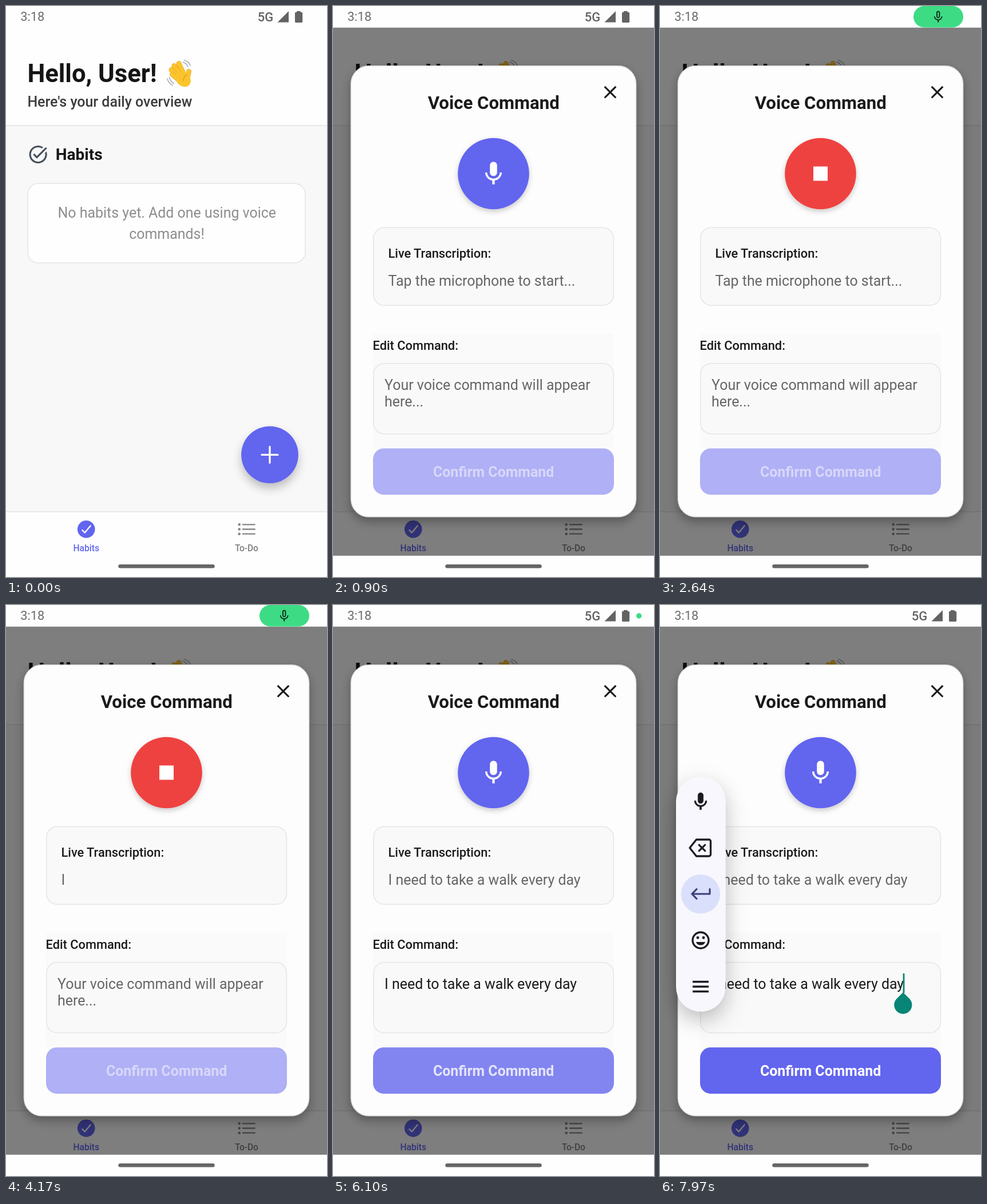
These frames come from a looping animation (561x998 px, 8 s). An HTML page:

```html
<!DOCTYPE html>
<html lang="en">
<head>
<meta charset="utf-8">
<title>Voice command</title>
<style>
  html, body { margin: 0; width: 100%; height: 100%; overflow: hidden; background: #fefefe; }
  svg { display: block; width: 561px; height: 998px; font-family: Roboto, "Noto Sans", sans-serif; font-size: 24.93px; }
  .medium { font-weight: 500; }
  .semi { font-weight: 600; }
  .bold { font-weight: 700; }
  .mid { text-anchor: middle; }
  .label { font-size: 21.8px; font-weight: 500; fill: #1a1a1a; }
  .tab { font-size: 15.6px; font-weight: 500; text-anchor: middle; }
  .hint { fill: #666; }
  .box { stroke: #e5e5e5; stroke-width: 1.5; }
  .line { fill: none; stroke-linecap: round; stroke-linejoin: round; }
</style>
</head>
<body>
<svg viewBox="0 0 561 998">
  <defs>
    <filter id="fabShadow" x="-50%" y="-50%" width="200%" height="200%">
      <feDropShadow dx="0" dy="9" stdDeviation="8" flood-opacity=".24"/>
    </filter>
    <filter id="micShadow" x="-50%" y="-50%" width="200%" height="200%">
      <feDropShadow dx="0" dy="4" stdDeviation="5" flood-opacity=".2"/>
    </filter>
    <filter id="sheetShadow" x="-20%" y="-20%" width="140%" height="140%">
      <feDropShadow dx="0" dy="8" stdDeviation="9" flood-opacity=".3"/>
    </filter>
    <filter id="barShadow" x="-100%" y="-30%" width="300%" height="160%">
      <feDropShadow dx="0" dy="14" stdDeviation="18" flood-opacity=".26"/>
    </filter>
    <path id="micIcon" d="M12 14c1.66 0 2.99-1.34 2.99-3L15 5c0-1.66-1.34-3-3-3S9 3.34 9 5v6c0 1.66 1.34 3 3 3zm5.3-3c0 3-2.54 5.1-5.3 5.1S6.7 14 6.7 11H5c0 3.41 2.72 6.23 6 6.72V21h2v-3.28c3.28-.48 6-3.3 6-6.72h-1.7z"/>
  </defs>

  <!-- home page -->
  <rect width="561" height="998" fill="#fefefe"/>
  <rect y="209" width="561" height="675" fill="#f8f8f8"/>
  <path d="M0 209H561M0 884H561" stroke="#e4e4e4" stroke-width="1.6"/>
  <text class="bold" x="37.4" y="133.3" font-size="43.6" fill="#151515">Hello, User!</text>
  <g id="wave" class="line"></g>
  <text class="medium" x="37.4" y="176" fill="#3c3c3c">Here's your daily overview</text>
  <path transform="translate(37.4 240.8) scale(1.558)" fill="#474f5d" d="M22 5.18 10.59 16.6l-4.24-4.24 1.41-1.41 2.83 2.83 10-10L22 5.18zm-2.21 5.04c.13.57.21 1.17.21 1.78 0 4.42-3.58 8-8 8s-8-3.58-8-8 3.58-8 8-8c1.58 0 3.04.46 4.28 1.25l1.44-1.44C16.1 2.67 14.13 2 12 2 6.48 2 2 6.48 2 12s4.48 10 10 10 10-4.48 10-10c0-1.19-.22-2.33-.6-3.39l-1.61 1.61z"/>
  <text class="semi" x="86.8" y="269" font-size="28" fill="#151515">Habits</text>
  <rect class="box" x="38" y="310.3" width="485" height="138.7" rx="18.7" fill="#fefefe"/>
  <g class="mid" fill="#8d8d8d">
    <text x="281.3" y="369.8">No habits yet. Add one using voice</text>
    <text x="281" y="407.2">commands!</text>
  </g>
  <g id="fab">
    <circle cx="461" cy="784.3" r="49.9" fill="#6265ee" filter="url(#fabShadow)"/>
    <path class="line" d="M461 770.3v28M447 784.3h28" stroke="#fff" stroke-width="3.3"/>
  </g>
  <circle cx="140.2" cy="914.5" r="15.3" fill="#6265ee"/>
  <path class="line" d="M133.3 916l4.4 4.5 10-12" stroke="#fff" stroke-width="2.3"/>
  <text class="tab" x="140.2" y="953.3" fill="#6265ee">Habits</text>
  <path class="line" d="M413.8 906.3h21M413.8 914.5h21M413.8 922.7h21" stroke="#858585" stroke-width="2.3"/>
  <path class="line" d="M407.7 906.3h0M407.7 914.5h0M407.7 922.7h0" stroke="#858585" stroke-width="4.6"/>
  <text class="tab" x="420.5" y="953.3" fill="#808080">To-Do</text>

  <!-- voice dialog -->
  <g id="dialog">
    <rect y="37.8" width="561" height="923" fill-opacity=".5"/>
    <rect x="31.5" y="104.8" width="498" height="788" rx="31" fill="#fdfdfd" stroke="#dfdfdf" stroke-width="1.4" filter="url(#sheetShadow)"/>
    <text class="bold mid" x="280.7" y="179.5" font-size="31.16" fill="#1a1a1a">Voice Command</text>
    <path transform="translate(465.8 132) scale(1.558)" fill="#1a1a1a" d="M19 6.41L17.59 5 12 10.59 6.41 5 5 6.41 10.59 12 5 17.59 6.41 19 12 13.41 17.59 19 19 17.59 13.41 12z"/>
    <circle id="micDisc" cx="280.5" cy="293" r="62.3" filter="url(#micShadow)"/>
    <use id="micOn" href="#micIcon" transform="translate(255.5 268) scale(2.083)" fill="#fff"/>
    <rect id="stop" x="268" y="280.5" width="25" height="25" fill="#fff"/>
    <rect class="box" x="70.8" y="387.3" width="419.6" height="136" rx="18.7" fill="#f9f9f9"/>
    <text class="label" x="96.5" y="440">Live Transcription:</text>
    <text class="hint" id="live" x="96.5" y="489"></text>
    <rect x="70" y="573" width="420.5" height="200" fill="#fafafa"/>
    <text class="label" x="69.6" y="600.5">Edit Command:</text>
    <rect class="box" x="70.8" y="624.8" width="419.6" height="123" rx="18.7" fill="#f9f9f9"/>
    <g id="placeholder" class="hint">
      <text x="90" y="670.8">Your voice command will appear</text>
      <text x="90" y="700">here...</text>
    </g>
    <text id="edit" x="90" y="670.8" fill="#1a1a1a">I need to take a walk every day</text>
    <g id="caret" fill="#078576">
      <rect x="424.6" y="644" width="2.8" height="34"/>
      <path d="M424.8 677l11.05 11.05A15.6 15.6 0 1 1 413.75 688.05z"/>
    </g>
    <rect id="button" x="70" y="773.2" width="421" height="81" rx="18.7" fill="#6265ee"/>
    <text id="buttonText" class="semi mid" x="280.6" y="822.6" fill="#fff">Confirm Command</text>
  </g>

  <!-- keyboard side bar -->
  <g id="sidebar">
    <rect x="28" y="300.5" width="86.5" height="410" rx="43" fill="#f8f7fd" filter="url(#barShadow)"/>
    <use href="#micIcon" transform="translate(52.3 325) scale(1.558)" fill="#1b1b20" stroke="#1b1b20" stroke-width=".4"/>
    <g class="line" stroke="#1b1b20" stroke-width="3.3">
      <path d="M63.5 410H85.5a3 3 0 0 1 3 3V436a3 3 0 0 1-3 3H63.5L52 424.5zM68.3 419.3l10.4 10.4M78.7 419.3l-10.4 10.4"/>
      <circle cx="71" cy="586" r="14"/>
      <path stroke-linecap="butt" d="M57 658.5h28M57 667h28M57 675.5h28"/>
    </g>
    <g fill="#1b1b20">
      <circle cx="66" cy="581.5" r="2.4"/>
      <circle cx="76" cy="581.5" r="2.4"/>
      <path d="M62.8 589H79.2a8.8 8.8 0 0 1-16.4 0z"/>
    </g>
    <circle cx="71" cy="505.2" r="34.2" fill="#dadffb"/>
    <path class="line" d="M87 496.5V505H56M64 496.7L55.8 505l8.2 8.3" stroke="#3b4078" stroke-width="3.1"/>
  </g>

  <!-- system bars -->
  <text x="25.3" y="26" font-size="21.8" fill="#6b6b6b">3:18</text>
  <g id="signal" fill="#636363">
    <text class="medium" x="439.7" y="26.6" font-size="22">5G</text>
    <path d="M474.5 28.5L494 9V28.5zM508 9h6.8v2h2q1.4 0 1.4 1.4V27.6q0 1.4-1.4 1.4h-10.4q-1.4 0-1.4-1.4V12.4q0-1.4 1.4-1.4h1.6z"/>
  </g>
  <rect id="chip" fill="#3ddc84"/>
  <path id="chipMic" transform="translate(473.6 6.5) scale(1.05)" fill="#10281a" d="M12 14c1.66 0 2.99-1.34 2.99-3L15 5c0-1.66-1.34-3-3-3S9 3.34 9 5v6c0 1.66 1.34 3 3 3zm-1.2-9.1c0-.66.54-1.2 1.2-1.2s1.2.54 1.2 1.2l-.01 6.2c0 .66-.53 1.2-1.19 1.2s-1.2-.54-1.2-1.2V4.9zm6.5 6.1c0 3-2.54 5.1-5.3 5.1S6.7 14 6.7 11H5c0 3.41 2.72 6.23 6 6.72V21h2v-3.28c3.28-.48 6-3.3 6-6.72h-1.7z"/>
  <rect x="196.3" y="976" width="168.4" height="6.4" rx="3.2" fill="#666"/>
</svg>
<script>
const LOOP = 8000, STEP = 200 / 3;
const $ = id => document.getElementById(id);
const set = (id, attrs) => {
  for (const key in attrs) $(id).setAttribute(key, attrs[key]);
};
const show = (id, on) => set(id, { opacity: +on });
const ramp = (t, start, length) => Math.min(1, Math.max(0, (t - start) / length));
const mix = (a, b, u) => a + (b - a) * u;
const inOut = u => u < .5 ? 2 * u * u : 1 - 2 * (1 - u) ** 2;
const easeOut = u => 1 - (1 - u) ** 2;

// Opacity of a tapped button: down to 0.2, then back.
const tap = (t, start) => t < start + 160
  ? mix(1, .2, inOut(ramp(t, start, 150)))
  : mix(.2, 1, inOut(ramp(t, start + 160, 250)));

const words = "I need to take a walk every day".split(" ");
const wordTimes = [4160, 4225, 4425, 4560, 4890, 4960, 5425, 6090];

function buildWave() {
  const finger = d => `<path d="${d}" stroke="#e2a11f" stroke-width="8.8"/><path d="${d}" stroke="#fcc42c" stroke-width="7.4"/>`;
  $("wave").innerHTML =
    ["M316 131L319.5 114.5", "M311 120L302 100.5", "M306 122L293.8 104.5", "M303 126L289 111.5", "M304 131L290.5 119.5"].map(finger).join("") +
    `<ellipse cx="309.5" cy="127.5" rx="15" ry="11.8" transform="rotate(48 309.5 127.5)" fill="#fcc42c"/>
     <path d="M310 131q0-9 7-11" stroke="#e2a11f" stroke-width="1.4"/>
     <path d="M309 98q6.5 2 9 8.5M311.5 94.8q8 2 11 9.5M285.5 124.5q1.5 7.5 8 11M281.8 127q2 8 9.3 11.5" stroke="#a6aeb2" stroke-width="1.5"/>`;
}

function drawChip(t) {
  const grow = easeOut(ramp(t, 2250, 380));
  const shrink = ramp(t, 5633.3, 133);
  const left = mix(mix(530, 443, grow), 530, shrink);
  const right = mix(530, 539.4, shrink);
  const height = mix(37.5, 9.4, shrink);
  set("chip", { x: left, y: mix(0, 14.3, shrink), width: right - left, height, rx: height / 2 });
  show("chip", grow > 0 && t < 6225);
  set("chipMic", { opacity: shrink > 0 ? 0 : ramp(grow, .6, .4) });
  set("signal", { opacity: shrink > 0 ? shrink : 1 - ramp(grow, 0, .5) });
}

function draw(time) {
  const t = (Math.floor(time / STEP - .49) + .5) * STEP;

  set("fab", { opacity: tap(t, 485) });
  const slide = .5 - .5 * Math.cos(Math.PI * ramp(t, 603, 290));
  set("dialog", { transform: `translate(0 ${mix(923, 0, slide)})` });
  show("dialog", slide > 0);

  const recording = t > 1990 && t < 6090;
  const alpha = tap(t, 1817);
  set("micDisc", { fill: recording ? "#ee4241" : "#6265ee", opacity: alpha });
  set("micOn", { opacity: recording ? 0 : alpha });
  set("stop", { opacity: recording ? alpha : 0 });

  const heard = wordTimes.filter(start => t >= start).length;
  $("live").textContent = heard ? words.slice(0, heard).join(" ") : "Tap the microphone to start...";

  const done = t > 6090;
  show("edit", done);
  show("placeholder", !done);
  const enabled = done ? mix(.5, 1, easeOut(ramp(t, 6045, 160))) : .5;
  set("button", { opacity: enabled });
  set("buttonText", { opacity: enabled });

  set("caret", { opacity: ramp(t, 7500, 190) });
  set("sidebar", { opacity: easeOut(ramp(t, 7775, 190)) });
  drawChip(t);
}

buildWave();
const begin = performance.now();
function tick() {
  draw((performance.now() - begin) % LOOP);
  requestAnimationFrame(tick);
}
tick();
</script>
</body>
</html>
```
